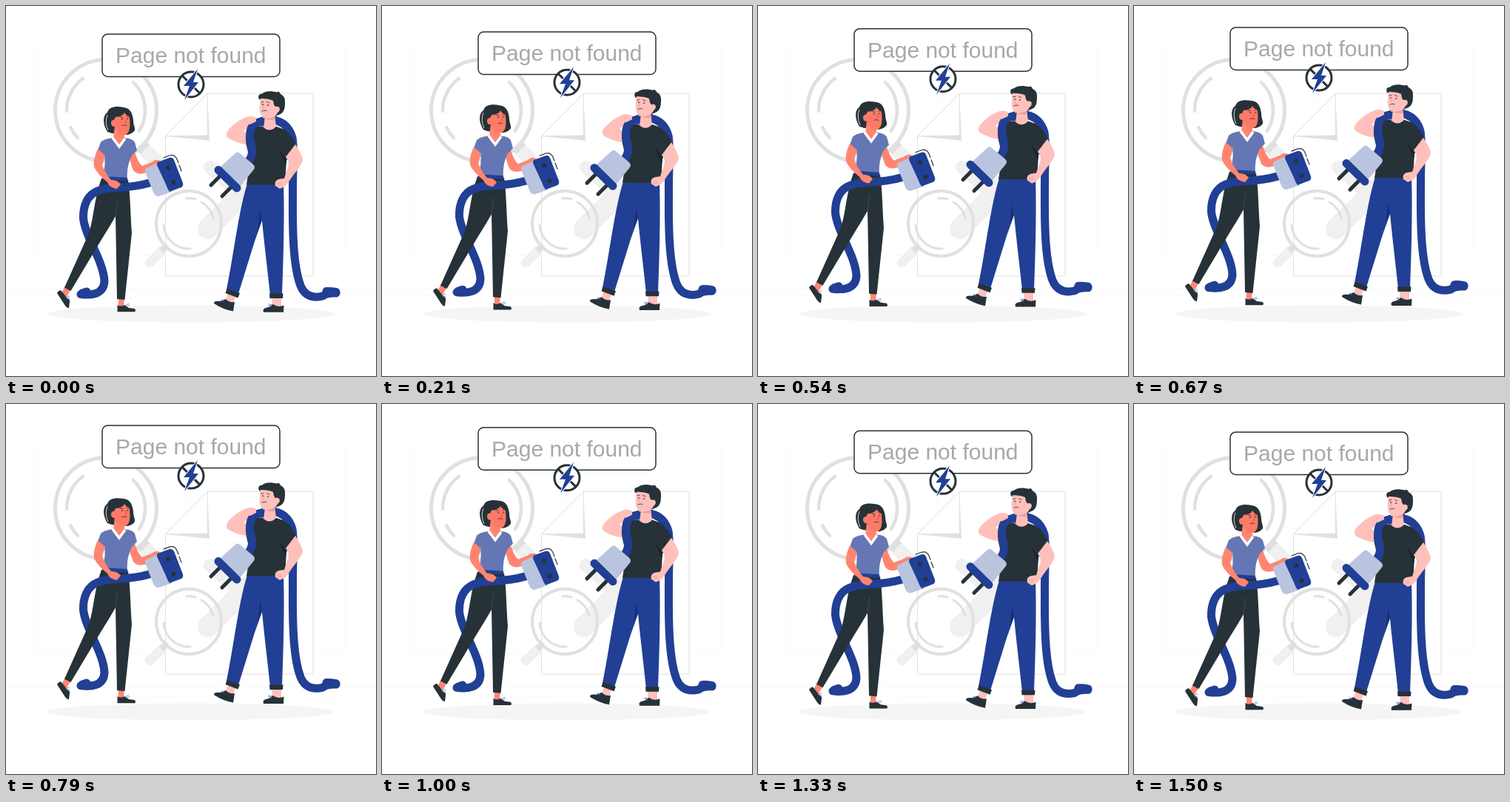
These frames come from a looping animation (500 by 500 pixels, 1.54 s). An HTML page:

```html
<!DOCTYPE html>
<html lang="en">
<head>
<meta charset="utf-8">
<title>Page not found</title>
<style>
  html, body { margin: 0; width: 100%; height: 100%; overflow: hidden; background: #fff; }
  svg { display: block; width: 100%; height: 100%; fill: none; }
  text { font: 30px "Liberation Sans", Arial, sans-serif; fill: #a6a8ab; text-anchor: middle; }
  .round { stroke-linecap: round; stroke-linejoin: round; }
  .faint { stroke: #ebebeb; stroke-width: .3; }
  .glass { stroke: #e0e0e0; }
  .handle { stroke: #f0f0f0; }
  .dark { fill: #263238; }
  .blue { fill: #213f94; }
  .pale { fill: #bac4df; }
  .shirt { fill: #6477b4; }
  .rose { fill: #ff8571; }
  .blush { fill: #ff7a66; }
  .pink { fill: #ffc0bb; }
  .ink { stroke: #263238; }
  .cord { stroke: #213f94; stroke-width: 11; }
  .lace { stroke: #5674c4; stroke-width: .8; }
</style>
</head>
<body>
<svg viewBox="0 0 500 500">
  <g id="background">
    <g class="faint">
      <path d="M0 382.5H500M52 391H95M104 391H111M131 395H225M396 389H416M417 398.500H450M322 401H331"/>
      <rect x="39" y="55" width="204" height="282.500" rx="5.500"/>
      <rect x="254" y="55" width="204" height="282.500" rx="5.500"/>
    </g>
    <ellipse cx="249.500" cy="416" rx="193.500" ry="11.500" fill="#f5f5f5"/>

    <path class="handle" stroke-width="19" d="M187 194 222 229"/>
    <path class="glass" stroke-width="18" d="M178 184 188 194"/>
    <circle class="glass" cx="135" cy="141" r="68.500" stroke-width="5" fill="#fff"/>
    <path class="glass round" stroke-width="4.500" d="M82 142A53 53 0 0 1 104 98M87 164A53 53 0 0 0 97 178M172 103A53 53 0 0 1 180 169"/>

    <path d="M272.500 118H415V365H215.500V176Z" fill="#fff" stroke="#e0e0e0"/>
    <path d="M216 176 275 182 273 140Z" fill="#e0e0e0"/>
    <path d="M272.500 118V175L215.500 176Z" fill="#fff" stroke="#e0e0e0"/>
    <path class="handle round" stroke-width="18" d="M276 218 312 250"/>
    <path class="handle round" stroke-width="28" d="M273 301 334 240"/>

    <path class="handle round" stroke-width="13" d="M194 347 211 331"/>
    <path class="glass" stroke-width="8" d="M210 331 218 323"/>
    <circle class="glass" cx="247" cy="294" r="44" stroke-width="4"/>
    <path class="glass round" stroke-width="3" d="M244 260A34 34 0 0 1 256 261M264 265A34 34 0 0 1 280 286M213 296A34 34 0 0 0 249 328"/>
  </g>

  <g id="floating">
    <rect x="130" y="37.900" width="240" height="57.500" rx="7.500" fill="#fff" class="ink" stroke-width="1.500"/>
    <text x="249.800" y="76.800">Page not found</text>
    <circle class="ink" cx="250" cy="106" r="17" stroke-width="3" fill="#fff"/>
    <path class="ink" stroke-width="3" d="M238 94 262 118"/>
    <path class="blue" stroke="#fff" stroke-width="2" paint-order="stroke" d="M259 85 240 108 248 108 241 127 260 103 253 103Z"/>

    <g id="woman">
      <path class="cord round" d="M124 250C110 255 104 270 104.500 287C107 312 132 345 133 372C132 391 113 391 101 389.500"/>
      <path class="cord round" stroke-width="9" d="M103 388 109 386"/>
      <path class="rose" d="M80 378 87 384 82 393 75 388ZM152 392H160L159 406H152Z"/>
      <path class="dark" d="M69 388Q70 385 74 384L83 395Q87 397 86 400L85 408Q83 409 80 405ZM150.500 404Q155 407 160 404L166 408 174 409Q176 412 174 413.200H150.500Z"/>
      <path class="lace" d="M80 394 86 392M82 396 86 395M161 405 166 402M163 406 167 404"/>
      <path class="dark" d="M129 233 165 235C168 254 168 280 170 307L160.500 397 150 396 148.500 310 148 284C146 288 137 303 130 314L87.500 385 79 380.500 112 307C119 285 119 260 129 233Z"/>
      <path d="M148 284 151 262" stroke="#455a64" stroke-width=".7"/>

      <path class="rose" d="M172 193C176 202 178 211 184 216L197 211Q202 206 208 209L211 213 197 220C190 228 176 229 172 222C168 213 166 204 166 196Z"/>
      <path class="shirt" d="M145 178C137 179 131 181 128 184L124 195 133 203C135 214 132 223 131 234L164 236C163 222 165 212 170 202L177 195 174 184C171 180 167 179 160 178L153 188Z"/>
      <path class="blue" d="M131 230 164 232 164.500 237 130 234.500Z"/>

      <path class="dark" d="M137 170C130 159 131 147 137 144C139 136 149 135 159 137C169 138 171 147 172 154C172 161 175 165 174 168C172 171 169 173 164 174L143 172Z"/>
      <path d="M137 147Q133 157 138 168" stroke="#fff" stroke-width=".8"/>
      <path class="rose" d="M147 162 160 168 160 179 154 189 145 179Z"/>
      <path stroke="#fff" stroke-width="3.500" d="M144 178 153 190 161 179"/>
      <path class="blush" d="M148 150C154 150 159 147 160 144C162 148 166 148 167 151C168 162 168 172 161 174C154 174 149 169 147 163C141 164 140 153 146 154Z"/>
      <path class="ink round" stroke-width=".8" d="M154 150 158 150.500M163 149.500 166 148M157 161.500Q160 160 163 161.500"/>
      <path stroke="#d84c3b" stroke-width=".8" d="M161 153 163 157 160.500 158"/>
      <circle class="dark" cx="157" cy="153" r=".9"/><circle class="dark" cx="164.500" cy="152.500" r=".9"/>

      <path class="cord round" d="M123 250.500C139 242 160 249 194 239"/>
      <path class="rose" d="M124 193C120 202 118 210 119 217C122 225 131 233 137 238Q140 246 150 247L155 241Q151 235 142 235C136 228 132 220 130 215L134 202Z"/>

      <path class="pale" d="M190 219 207 211 224 251 207 257Q203 258 200 254L188 224Q187 221 190 219Z"/>
      <path class="blue" d="M205 211 221 205Q225 204 227 208L239 239Q240 243 237 245L221 251Q218 247 216 241L204 215Q204 212 205 211Z"/>
      <circle class="dark" cx="219" cy="218.500" r="3"/><circle class="dark" cx="226.500" cy="238.500" r="3"/>
      <path class="ink round" stroke-width="1.200" d="M213 205 221 202Q228 200 231 207L233 212M234 215 237 223"/>
    </g>

    <g id="man">
      <path class="cord round" d="M342 157C359 150 380 154 387 178C390 195 387 225 387.500 258C387 314 389 354 398 378C404 393 416 395 428 392C434 387 440 388 446 388"/>
      <path class="cord round" d="M433 385.500Q438 385 446 386.500"/>
      <path class="pink" d="M302 383 312 387 306 404 296 399ZM359 389H372V407H360Z"/>
      <path class="dark" d="M281 401Q282 398 290 399L297 396Q301 401 309 400L307 412.500Q293 410 281 402ZM347.500 411Q348 408 355 407L361 403Q367 408 375.500 404.500L375 413.800H348Z"/>
      <path class="lace" d="M291 396 295 400M289 399 295 397M355 402 359 407M354 405 360 403"/>
      <path class="blue" d="M326 240H375C376 270 376 316 373 392L357 391C354 362 350 331 346 290L336 318 314 389 298 383C307 341 314 278 326 240Z"/>
      <path class="dark" d="M298.500 382 316 388 313.500 394.500 296.500 388ZM356 388.500H374.500L374 395H356.500Z"/>
      <path d="M344 274 340 304 345 290Z" fill="#172d70"/>

      <path class="pink" d="M330 187C320 188 309 183 301 179Q295 175 300 168C307 160 316 153 323 151Q331 147 337 151L339 158 331 161 321 169 329 174Z"/>
      <path class="dark" d="M337 163C328 165 324 170 324 180C325 197 332 205 329 215L325 241.500H377L379 209 392 188C388 178 382 170 374 166L363 162Z"/>
      <path class="pink" d="M347 149 363 147 365 163Q356 172 347 163Z"/>
      <path d="M351 153 363 147 362 154Z" fill="#ec9892"/>
      <path class="pink" d="M391 187C396 195 401 203 401 209C397 219 388 228 383 236Q379 244 370 247L364 243Q362 236 369 234L376 233 383 212 378 204Z"/>
      <path stroke="#ec9892" stroke-width=".8" d="M366 240 372 239M367 243 373 241"/>
      <path d="M368 193 379 207 378 215Z" fill="#17262c"/>

      <path class="dark" d="M342 126Q339 119 346 118.500C351 114 360 115 366 116.500Q369 114 371 119Q378 122 377 132Q377 143 371 146L364 149 347 128Z"/>
      <path class="pink" d="M344 125C351 125 358 126 361 128C362 134 363 136 365 136C370 134 372 141 367 144C364 151 356 153 349 151C343 149 342 141 343 134Z"/>
      <path class="ink round" stroke-width=".8" d="M344.500 130 348 129.500M352.500 129.500 356 131M346 142Q349 140.500 352 141.500"/>
      <path stroke="#ec9892" stroke-width=".8" d="M349 133 347 138 349 139"/>
      <circle class="dark" cx="347" cy="133" r=".9"/><circle class="dark" cx="354" cy="134" r=".9"/>

      <path class="cord" d="M320 218C338 202 332 193 330 181C328 166 333 155 349 157"/>
      <path class="pink" d="M323 151Q331 147 338 151L338 156 330 160 322 159Z"/>
      <path class="ink round" stroke-width="5" d="M289 230 277 242M304 245 292 257"/>
      <path class="pale" d="M310 199Q313 196 316 199L334 214Q338 218 334 222L317 243 290 217Z"/>
      <path class="cord round" stroke-width="12" d="M287 221.500 312 246"/>
    </g>
  </g>
</svg>
<script>
  const LOOP = 1540, STEP = 1000 / 24, PERIOD = 1500, LEAD = 20, RISE = 10;
  const floating = document.getElementById("floating");

  // Linear bob: up for half a period, then back down.
  const lift = ms => {
    const phase = ((ms + LEAD) % PERIOD) / PERIOD;
    return RISE * (1 - Math.abs(1 - 2 * phase));
  };

  function draw(now) {
    const time = Math.floor((now % LOOP + 5) / STEP) * STEP;
    floating.setAttribute("transform", `translate(0 ${(lift(0) - lift(time)).toFixed(2)})`);
    requestAnimationFrame(draw);
  }
  draw(performance.now());
</script>
</body>
</html>
```
